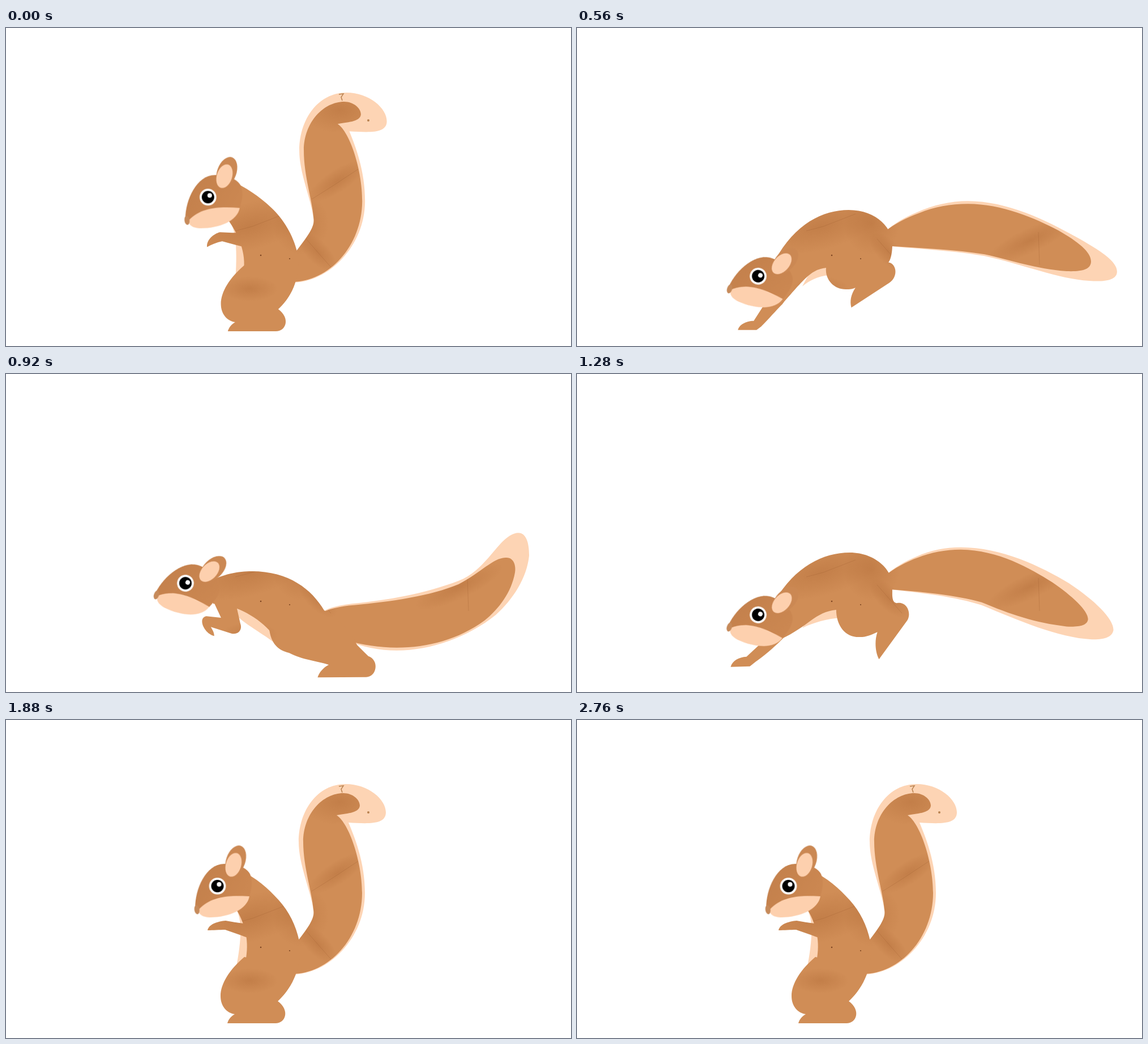
Recreate the animation shown at these times as an HTML page without scripts. Size 998 by 561 pixels, loop 3480 ms.

```html
<!DOCTYPE html>
<html lang="en">
<head>
<meta charset="utf-8">
<title>Squirrel</title>
<style>
html, body { margin: 0; width: 100%; height: 100%; overflow: hidden; background: #fff; }
svg { display: block; width: 100%; height: 100%; }
.fur { fill: url(#fur); }
.cream { fill: url(#cream); }
.fur, .cream, .head, .wag { animation: 3480ms linear infinite; }
.tail-edge { animation-name: tail-edge; }
.tail-core { animation-name: tail-core; }
.belly { animation-name: belly; }
.torso { animation-name: torso; }
.leg { animation-name: leg; }
.arm { animation-name: arm; }
.head { animation-name: head; }
.wag { animation-name: wag; transform-origin: 500px 425px; }

/* stand, push off, land, gather, push off, reach, crouch, stand */
@keyframes tail-edge {
  0%, 54.02%, 100% { d: path("M505,405C535,365 546,350 543,335C538,300 517,255 517,215C517,160 550,113 600,113C640,113 671,140 671,163C671,185 640,183 605,181C615,205 634,250 634,305C634,385 570,449 505,449Z"); }
  5.75%, 26.44% { d: path("M550,425C570,411 590,408 615,405C670,400 740,388 800,365C845,347 865,300 890,285C915,270 924,290 924,320C920,360 895,398 865,425C815,465 750,488 690,488C660,488 630,482 600,470Z"); }
  16.09% { d: path("M545,358C560,345 580,333 600,325C628,312 660,305 690,305C760,305 830,340 880,368C925,393 954,412 954,430C954,446 930,448 905,446C850,443 790,417 720,402C670,393 610,390 545,384Z"); }
  36.78% { d: path("M545,355C560,342 580,330 600,322C625,311 650,306 678,306C750,306 820,340 870,370C915,400 948,432 948,452C946,466 930,469 910,469C850,466 780,435 715,408C670,393 610,386 545,379Z"); }
  2.87%, 44.83% { d: path("M520,415C535,375 545,352 560,330C580,295 600,275 625,255C660,227 700,213 742,213C810,213 885,330 836,336C810,338 795,296 757,298C730,300 690,340 650,372C600,412 570,447 520,447Z"); }
  44.83% { animation-timing-function: cubic-bezier(.2,.5,.5,1); }
}
@keyframes tail-core {
  0%, 54.02%, 100% { d: path("M505,403C535,365 546,350 543,335C541,305 525,260 525,215C525,165 560,129 596,129C612,129 625,140 625,151C624,165 598,165 584,168C606,182 629,250 629,305C629,385 570,448 505,448Z"); }
  5.75%, 26.44% { d: path("M550,425C570,414 590,410 615,408C680,402 750,392 800,371C840,350 860,325 882,324C898,322 901,340 899,350C893,385 870,415 845,435C800,468 745,483 690,483C660,483 630,478 600,470Z"); }
  16.09% { d: path("M545,358C560,346 582,334 605,326C630,315 660,310 690,310C750,310 810,336 850,357C885,377 908,395 908,412C908,427 890,430 865,429C810,425 770,410 720,399C670,391 610,388 545,384Z"); }
  36.78% { d: path("M545,355C560,343 582,331 602,324C625,315 650,310 678,310C745,311 800,343 840,368C875,392 903,418 903,433C902,445 885,447 865,446C810,440 765,424 715,403C670,390 610,384 545,379Z"); }
  2.87%, 44.83% { d: path("M520,415C536,378 548,355 562,333C582,300 605,278 630,260C662,236 700,223 735,223C775,223 820,258 820,283C820,303 790,295 765,289C735,288 690,332 650,366C600,408 570,446 520,447Z"); }
  44.83% { animation-timing-function: cubic-bezier(.2,.5,.5,1); }
}
@keyframes belly {
  0% { d: path("M392,336C405,350 409,385 405,440L450,425L430,360Z"); }
  5.75%, 26.44% { d: path("M400,418C415,438 445,452 478,477L480,450L420,405Z"); }
  16.09% { d: path("M398,456C410,446 425,438 445,436L450,415L420,415Z"); }
  36.78% { d: path("M398,448C420,438 440,432 466,430L470,410L420,415Z"); }
  22.41%, 44.83% { d: path("M380,415C390,418 400,419 410,419L430,415L420,400Z"); }
  44.83% { animation-timing-function: cubic-bezier(.2,.5,.5,1); }
  54.02%, 100% { d: path("M406,333C417,350 417,385 406,440L450,425L440,360Z"); }
}
@keyframes torso {
  0% { d: path("M400,270C422,280 447,296 469,317C490,337 507,365 514,395C521,435 508,470 480,496C450,500 420,470 420,425C424,390 405,355 390,335Z"); }
  5.75%, 26.44% { d: path("M350,370C385,352 410,348 434,348C500,348 540,380 562,417C590,435 610,455 620,478C590,510 490,500 465,452C440,425 400,405 366,405Z"); }
  16.09% { d: path("M350,410C385,345 435,321 480,321C530,321 560,355 557,385C556,405 552,412 548,416C520,420 470,425 440,423C415,427 408,435 362,488Z"); }
  22.41% { d: path("M345,375C375,350 410,340 445,338C500,340 535,365 555,400C575,440 570,495 515,500C470,495 425,470 425,430C405,425 385,425 365,425Z"); }
  36.78% { d: path("M350,400C385,340 435,315 482,315C530,315 562,350 557,380C556,398 554,400 553,403C520,412 480,415 458,416C420,420 410,445 360,468Z"); }
  44.83% { d: path("M345,360C372,342 400,336 427,336C480,338 510,360 528,397C538,440 545,500 480,501C440,490 405,460 411,421C395,421 370,424 363,412Z"); animation-timing-function: cubic-bezier(.2,.5,.5,1); }
  54.02%, 100% { d: path("M418,268C440,277 463,297 482,318C500,338 512,362 518,390C523,435 508,470 480,496C450,500 420,470 424,420C430,385 420,355 406,333Z"); }
}
@keyframes leg {
  0%, 54.02%, 100% { d: path("M421,418C395,440 379,465 379,487C379,505 390,517 404,519C397,523 393,528 391,535L476,535C494,535 502,512 480,496C500,478 510,455 512,440Z"); }
  5.75%, 26.44% { d: path("M465,450C468,475 480,487 500,492C525,505 545,505 570,513C560,518 553,526 550,535L636,535C655,535 660,505 640,498C632,490 625,483 616,474Z"); }
  8.33%, 29.02% { d: path("M468,440C470,468 485,483 508,488C540,495 565,500 585,505C580,520 582,540 590,562L650,505C665,490 655,470 638,478C630,470 620,455 605,440Z"); }
  16.09% { d: path("M440,423C438,445 455,461 475,461C482,461 488,460 492,458C484,470 482,482 485,493L552,449C570,437 564,410 545,413C550,405 556,395 556,380Z"); }
  22.41% { d: path("M425,428C418,445 420,465 428,478C436,490 444,498 452,507C425,512 410,525 405,539L490,539C510,539 512,518 505,498C545,498 565,480 565,445Z"); }
  36.78% { d: path("M458,415C458,445 475,465 500,464C512,464 520,460 531,455C526,470 527,490 534,503L584,434C592,420 582,400 565,404C556,403 557,390 557,380Z"); }
  44.83% { d: path("M411,421C400,440 395,460 402,475C410,488 420,497 429,507C400,512 385,525 380,540L465,540C484,540 485,520 480,501C520,500 537,480 537,448Z"); animation-timing-function: cubic-bezier(.2,.5,.5,1); }
}
@keyframes arm {
  0% { d: path("M415,361L400,361L378,360C366,363 354,374 355,386C363,382 372,378 382,376L405,382C412,384 418,385 424,387L430,365Z"); }
  5.75%, 26.44% { d: path("M366,400L380,430L354,427C338,430 350,458 368,462C368,455 364,450 362,446L399,458C412,460 418,450 414,440L405,400Z"); }
  16.09% { d: path("M345,470L330,489L312,517C298,517 286,524 284,533C295,533 305,533 317,533L325,527C340,512 350,500 362,488L375,470Z"); }
  36.78% { d: path("M345,455L325,475L299,499C285,500 274,506 271,517C283,517 293,516 305,516L315,508C330,497 345,485 362,468L375,455Z"); }
  44.83% { d: path("M411,420L408,435L402,447C388,448 378,453 377,461C385,461 393,461 400,461L415,462C425,462 430,450 430,440L430,420Z"); animation-timing-function: cubic-bezier(.2,.5,.5,1); }
  54.02%, 100% { d: path("M420,359L405,357L388,354C375,355 358,360 356,371C365,371 378,370 387,370L410,378C418,381 424,383 430,385L435,362Z"); }
}
@keyframes head {
  0% { transform: translate(357px, 298px) rotate(0deg); }
  5.75% { transform: translate(316px, 372px) rotate(25deg); }
  10.34% { transform: translate(311px, 390px) rotate(27deg); }
  16.09% { transform: translate(320px, 438px) rotate(24deg); }
  22.41% { transform: translate(318px, 405px) rotate(20deg); }
  26.44% { transform: translate(317px, 369px) rotate(26deg); }
  31.61% { transform: translate(313px, 385px) rotate(27deg); }
  36.78% { transform: translate(320px, 425px) rotate(25deg); }
  44.83% { transform: translate(308px, 394px) rotate(0deg); animation-timing-function: cubic-bezier(.2,.5,.5,1); }
  54.02%, 65.52%, 79.31%, 100% { transform: translate(373.5px, 293px) rotate(-1deg); animation-timing-function: ease-in-out; }
  72.41% { transform: translate(376px, 292px) rotate(0deg); animation-timing-function: ease-in-out; }
}
@keyframes wag {
  0%, 65.52%, 79.31%, 100% { transform: rotate(0deg); animation-timing-function: ease-in-out; }
  72.41% { transform: rotate(10deg); animation-timing-function: ease-in-out; }
}
</style>
</head>
<body>
<svg viewBox="0 0 998 561">
  <defs>
    <radialGradient id="stain">
      <stop offset="0" stop-color="#a9622f" stop-opacity=".34"/>
      <stop offset="1" stop-color="#a9622f" stop-opacity="0"/>
    </radialGradient>
    <!-- aged paper stays fixed on the stage while the shapes move over it -->
    <pattern id="fur" patternUnits="userSpaceOnUse" width="998" height="561">
      <rect width="998" height="561" fill="#d08d56"/>
      <g fill="url(#stain)">
        <ellipse cx="430" cy="350" rx="110" ry="42" transform="rotate(-15 430 350)"/>
        <ellipse cx="520" cy="345" rx="50" ry="55"/>
        <ellipse cx="590" cy="145" rx="70" ry="40"/>
        <ellipse cx="585" cy="270" rx="60" ry="20" transform="rotate(-33 585 270)"/>
        <ellipse cx="800" cy="375" rx="85" ry="22" transform="rotate(-25 800 375)"/>
        <ellipse cx="430" cy="460" rx="50" ry="22"/>
        <ellipse cx="550" cy="395" rx="45" ry="20" transform="rotate(45 550 395)"/>
      </g>
      <g fill="none" stroke="#9c5a2c" stroke-opacity=".3">
        <path d="M540,302L575,280L622,249M405,358L435,350L492,328M530,372L574,422M815,360L817,418"/>
      </g>
      <g fill="#7d4522">
        <circle cx="450" cy="401" r="1.3"/>
        <circle cx="501" cy="407" r="1.1"/>
      </g>
    </pattern>
    <pattern id="cream" patternUnits="userSpaceOnUse" width="998" height="561">
      <rect width="998" height="561" fill="#fdd4b4"/>
      <path d="M588,117L596,116L592,122L594,128M835,321L839,315" fill="none" stroke="#b9824f" stroke-width="1.5"/>
      <circle cx="640" cy="163" r="2" fill="#b9824f"/>
    </pattern>
    <linearGradient id="face" x1="0" y1="0" x2="1" y2=".4">
      <stop offset="0" stop-color="#c27f4b"/>
      <stop offset="1" stop-color="#cb8751"/>
    </linearGradient>
  </defs>

  <g class="wag">
    <path class="cream tail-edge"/>
    <path class="fur tail-core"/>
  </g>
  <path class="cream belly"/>
  <path class="fur torso"/>
  <path class="fur leg"/>
  <path class="fur arm"/>

  <g class="head">
    <path fill="url(#face)" d="M-40,38C-40,5 -20,-39 12,-39C35,-39 52,-32 58,-20C62,-10 62,0 56,20L-36,42Z"/>
    <ellipse cx="33" cy="-44" rx="17" ry="28" transform="rotate(20 33 -44)" fill="#cb8853"/>
    <ellipse cx="29" cy="-37" rx="13.5" ry="21.5" transform="rotate(18 29 -37)" fill="#fdd0ae"/>
    <path fill="#fdd0ae" d="M-33,40C-12,18 20,16 56,19C52,42 20,55 -13,55C-25,55 -36,50 -33,40Z"/>
    <ellipse cx="-37" cy="41" rx="4.5" ry="8" transform="rotate(-8 -37 41)" fill="#c68a5a"/>
    <circle r="14.8" fill="#fff"/>
    <circle r="11"/>
    <circle cx="3" cy="-3" r="4" fill="#fff"/>
  </g>
</svg>
</body>
</html>
```
